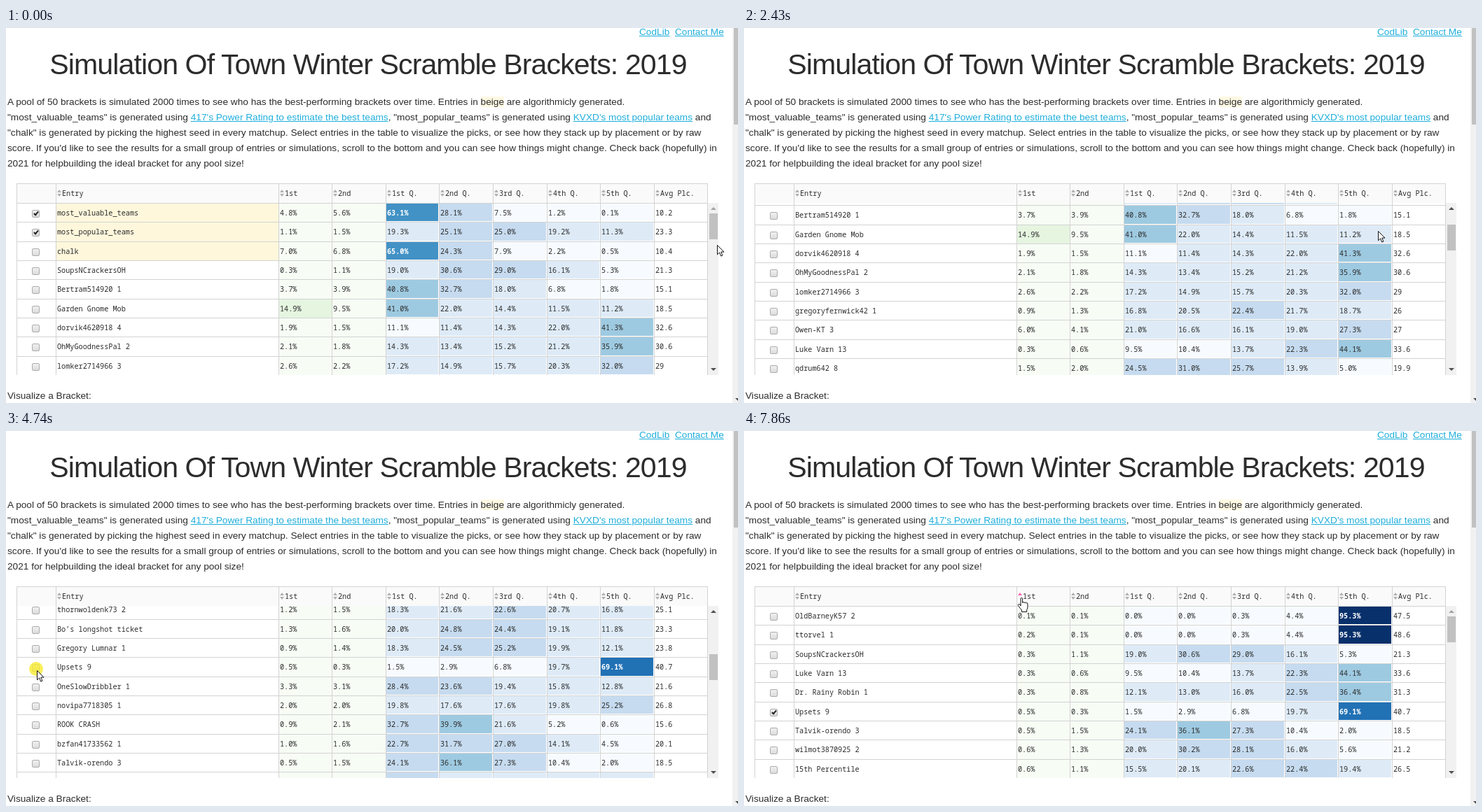
An HTML page that plays this animation: 1045x536 px, repeating every 8 s.

```html
<!DOCTYPE html>
<html lang="en">
<head>
<meta charset="utf-8">
<title>Bracket simulation</title>
<style>
html, body { margin: 0; width: 100%; height: 100%; overflow: hidden; background: #fff; }
body { position: relative; color: #2c2c2c; font: 13.66px/22px "Liberation Sans", Arial, sans-serif; }
body > *, .cell, .row, .box, .bar > * { position: absolute; }
h1 { left: 0; top: 27px; width: 1034px; margin: 0; text-align: center; white-space: nowrap;
  font-size: 41.1px; font-weight: 400; line-height: 50px; letter-spacing: -.91px; }
p { margin: 0; left: 2px; white-space: nowrap; }
u { color: #1eaedb; }
mark { color: inherit; background: #fff9e3; }
#head, #view { left: 0; width: 1002px; overflow: hidden;
  font: 10.2px/27px "Noto Sans Mono", "DejaVu Sans Mono", monospace; }
#head { top: 222px; height: 28px; }
#view { top: 250px; height: 246px; }
.list { position: absolute; left: 0; top: 0; }
.row { left: 0; width: 1002px; }
.cell { top: 0; height: 100%; box-sizing: border-box; padding-left: 1px; white-space: pre;
  border: solid #d3d3d3; border-width: 1px 0 0 1px; background-clip: padding-box; }
.cell:last-child { border-right-width: 1px; }
.blue { box-shadow: inset -1px -1px #fff; }
.dark { color: #fff; font-weight: 700; }
#head .cell { background-color: #fafafa; padding-left: 8px; }
#head svg { position: absolute; left: 1px; top: 8px; fill: #b0b0b0; }
.box { left: 21px; top: 9px; width: 9px; height: 9px; border: 1px solid #acacac; border-radius: 2px;
  background: linear-gradient(#f0f0f0, #dcdcdc); }
.on::after { content: ""; position: absolute; left: 2.5px; top: 0; width: 2px; height: 5px;
  border: solid #222; border-width: 0 2px 2px 0; transform: rotate(40deg); }
.bar { background: #f1f1f1; }
.bar i { width: 0; height: 0; border: 4px solid transparent; }
.bar b { background: #c1c1c1; }
#glow { width: 20px; height: 20px; margin: -12px -11px; border-radius: 50%; background: #f8ec2c; opacity: .78; }
#cursor { left: 0; top: 0; overflow: visible; fill: #fff; stroke: #111; stroke-linejoin: round; }
</style>
</head>
<body>
<p style="left:904px;top:-5px"><u>CodLib</u></p>
<p style="left:955px;top:-5px"><u>Contact Me</u></p>
<h1>Simulation Of Town Winter Scramble Brackets: 2019</h1>
<p style="top:95px">A pool of 50 brackets is simulated 2000 times to see who has the best-performing brackets over time. Entries in <mark>beige</mark> are algorithmicly generated.<br>
"most_valuable_teams" is generated using <u>417's Power Rating to estimate the best teams</u>, "most_popular_teams" is generated using <u>KVXD's most popular teams</u> and<br>
"chalk" is generated by picking the highest seed in every matchup. Select entries in the table to visualize the picks, or see how they stack up by placement or by raw<br>
score. If you'd like to see the results for a small group of entries or simulations, scroll to the bottom and you can see how things might change. Check back (hopefully) in<br>
2021 for helpbuilding the ideal bracket for any pool size!</p>
<div id="head"></div>
<div id="view"></div>
<div class="bar" style="left:1002px;top:250px;width:15px;height:246px">
  <i id="up" style="left:4px;top:2px;border-bottom-color:#505050"></i>
  <b id="thumb" style="left:2px;top:15px;width:12px;height:37px"></b>
  <i style="left:4px;top:236px;border-top-color:#505050"></i>
</div>
<div class="bar" style="left:1037px;top:0;width:17px;height:536px">
  <b style="left:2px;top:0;width:13px;height:138px"></b>
  <i style="left:4px;top:529px;border-top-color:#505050"></i>
</div>
<p style="top:515px">Visualize a Bracket:</p>
<div id="glow"></div>
<svg id="cursor" width="20" height="24">
  <path id="arrow" d="M.5.5V13.8L3.6 10.9 5.7 16 7.9 15.1 5.8 10.1H10z"/>
  <path id="hand" transform="translate(-5.5 -2)" d="M4.5 12V1.8a1.3 1.3 0 0 1 2.6 0V7.5q0-1 1.2-1t1.3 1.2q.2-.8 1.2-.8t1.3 1.3q.3-.6 1.1-.6 1.2 0 1.2 1.4V14q0 2-1.2 3.5V20.5H6V18Q4 16 1 11.5q-.6-1.3.3-1.9t2 .4z"/>
</svg>
<script>
// name | share of wins | average place
const entries = `most_valuable_teams|4.8|10.2
most_popular_teams|1.1|23.3
chalk|7|10.4
SoupsNCrackersOH|0.3|21.3
Bertram514920 1|3.7|15.1
Garden Gnome Mob|14.9|18.5
dorvik4620918 4|1.9|32.6
OhMyGoodnessPal 2|2.1|30.6
lomker2714966 3|2.6|29
gregoryfernwick42 1|0.9|26
Owen-KT 3|6|27
Luke Varn 13|0.3|33.6
qdrum642 8|1.5|19.9
thornwoldenk73 2|1.2|25.1
Bo’s longshot ticket|1.3|23.3
Gregory Lumnar 1|0.9|23.8
Upsets 9|0.5|40.7
OneSlowDribbler 1|3.3|21.6
novipa7718305 1|2|26.8
ROOK CRASH|0.9|15.6
bzfan41733562 1|1|20.1
Talvik-orendo 3|0.5|18.5
Half Time 6|2.4|24.6
OldBarneyK57 2|0.1|47.5
ttorvel 1|0.2|48.6
Dr. Rainy Robin 1|0.3|31.3
wilmot3870925 2|0.6|21.2
15th Percentile|0.6|26.5`.split("\n").map(line => {
  const [name, win, avg] = line.split("|");
  return { name, win: +win, avg: +avg };
});

const BLUES = "#f7fbff #deebf7 #c6dbef #9ecae1 #6baed6 #4292c6 #2171b5 #08519c #08306b".split(" ");
const GREENS = ["#f7fcf5", "#e5f5e0"];
const PITCH = 246 / 9;
const $ = id => document.getElementById(id);
const colX = i => i < 2 ? [15, 71][i] : Math.round(388.5 + 76.6 * (i - 2));

// Bell curve over the five quintiles, tilted until its mean gives the average place;
// frequent winners and low places get a flatter curve.
function quintiles({ win, avg }) {
  const mean = Math.min(3.95, (avg - 5.5) / 10);
  const curve = Math.max(-.1, (30 - avg) / 30 - win / 12);
  let low = -9, high = 9, shares;
  for (let n = 0; n < 30; n++) {
    const tilt = (low + high) / 2;
    const weights = [0, 1, 2, 3, 4].map(k => Math.exp(tilt * k - curve * k * k));
    const total = weights.reduce((a, b) => a + b);
    shares = weights.map(w => 100 * w / total);
    if (shares.reduce((sum, s, k) => sum + s * k / 100, 0) < mean) low = tilt;
    else high = tilt;
  }
  return shares;
}

function cell(i, html, color = "#fff", cls = "") {
  const width = colX(i + 1) - colX(i) + (i === 9 ? 1 : 0);
  return `<div class="cell ${cls}" style="left:${colX(i)}px;width:${width}px;background-color:${color}">${html}</div>`;
}

function rowHtml(entry, i) {
  const { name, win, avg } = entry;
  const top = Math.round(PITCH * i), height = Math.round(PITCH * (i + 1)) - top;
  const checked = /^most_[vp]/.test(name) ? "on" : name === "Upsets 9" ? "pick" : "";
  const beige = /^(most_|chalk)/.test(name) ? "#fef7dc" : "#fff";
  const q = quintiles(entry);
  const cells = [win, (win + q[0] / 10) / 2, ...q].map((share, k) => {
    const level = Math.floor(share * 9 / 100);
    return cell(k + 2, share.toFixed(1) + "%", (k < 2 ? GREENS : BLUES)[level],
      k < 2 ? "" : level > 4 ? "blue dark" : "blue");
  });
  return `<div class="row" style="top:${top}px;height:${height}px">` +
    cell(0, `<span class="box ${checked}"></span>`) + cell(1, name, beige) +
    cells.join("") + cell(9, avg) + "</div>";
}

function addList(rows) {
  const list = document.createElement("div");
  list.className = "list";
  list.innerHTML = rows.map(rowHtml).join("");
  $("view").append(list);
  return list;
}

const sortIcon = `<svg width="6" height="11"><path d="M0 4 3 0 6 4z"/><path d="M0 6 3 10 6 6z"/></svg>`;
$("head").innerHTML = ["", "Entry", "1st", "2nd", "1st Q.", "2nd Q.", "3rd Q.", "4th Q.", "5th Q.", "Avg Plc."]
  .map((label, i) => cell(i, label && sortIcon + label, "#fafafa")).join("");

const plain = addList(entries);
const sorted = addList([...entries].sort((a, b) => a.win - b.win));
const picks = document.querySelectorAll(".pick");
const firstIcon = document.querySelectorAll("#head svg")[1];

// time, x, y
const path = [
  [0, 1015, 310], [390, 1012, 294], [1549, 1012, 294], [1550, 967, 287],
  [2430, 905, 290], [3040, 896, 317], [3210, 912, 322], [3650, 640, 382], [4040, 337, 345],
  [4510, 44, 342], [5000, 44, 342], [5520, 460, 400], [6140, 411, 389],
  [7160, 396, 240], [8000, 396, 240]
];

function cursorAt(t) {
  const n = path.findIndex(p => p[0] > t);
  const [t0, x0, y0] = path[n - 1], [t1, x1, y1] = path[n];
  const u = (t - t0) / (t1 - t0);
  return [x0 + (x1 - x0) * u, y0 + (y1 - y0) * u];
}

function ease(t, from, to) {
  const u = Math.min(1, Math.max(0, (t - from) / (to - from)));
  return u * u * (3 - 2 * u);
}

const within = (t, from, to) => t >= from && t < to;
const show = (el, on) => { el.style.display = on ? "" : "none"; };

function draw(now) {
  const t = now % 8000;
  const scroll = Math.round(364 * (ease(t, 2115, 3000) - ease(t, 5610, 6160)));
  const [x, y] = cursorAt(t).map(Math.round);
  const hover = t >= 7310, isSorted = t >= 7860;

  plain.style.transform = `translateY(${-scroll}px)`;
  show(plain, !isSorted);
  show(sorted, isSorted);
  picks.forEach(box => box.classList.toggle("on", t >= 4900));

  $("thumb").style.top = 15 + Math.round(scroll * .149) + "px";
  $("thumb").style.background = within(t, 230, 1550) ? "#a8a8a8" : "#c1c1c1";
  $("up").style.borderBottomColor = scroll ? "#505050" : "#a3a3a3";

  firstIcon.style.fill = hover ? "hotpink" : "";
  show(firstIcon.lastChild, !isSorted);

  $("cursor").style.transform = `translate(${x}px,${y}px)`;
  show($("arrow"), !hover);
  show($("hand"), hover);
  $("glow").style.left = x + "px";
  $("glow").style.top = y + "px";
  show($("glow"), within(t, 4740, 4990) || within(t, 7460, 7710));
}

const start = performance.now();
function tick() {
  draw(performance.now() - start);
  requestAnimationFrame(tick);
}
tick();
</script>
</body>
</html>
```
